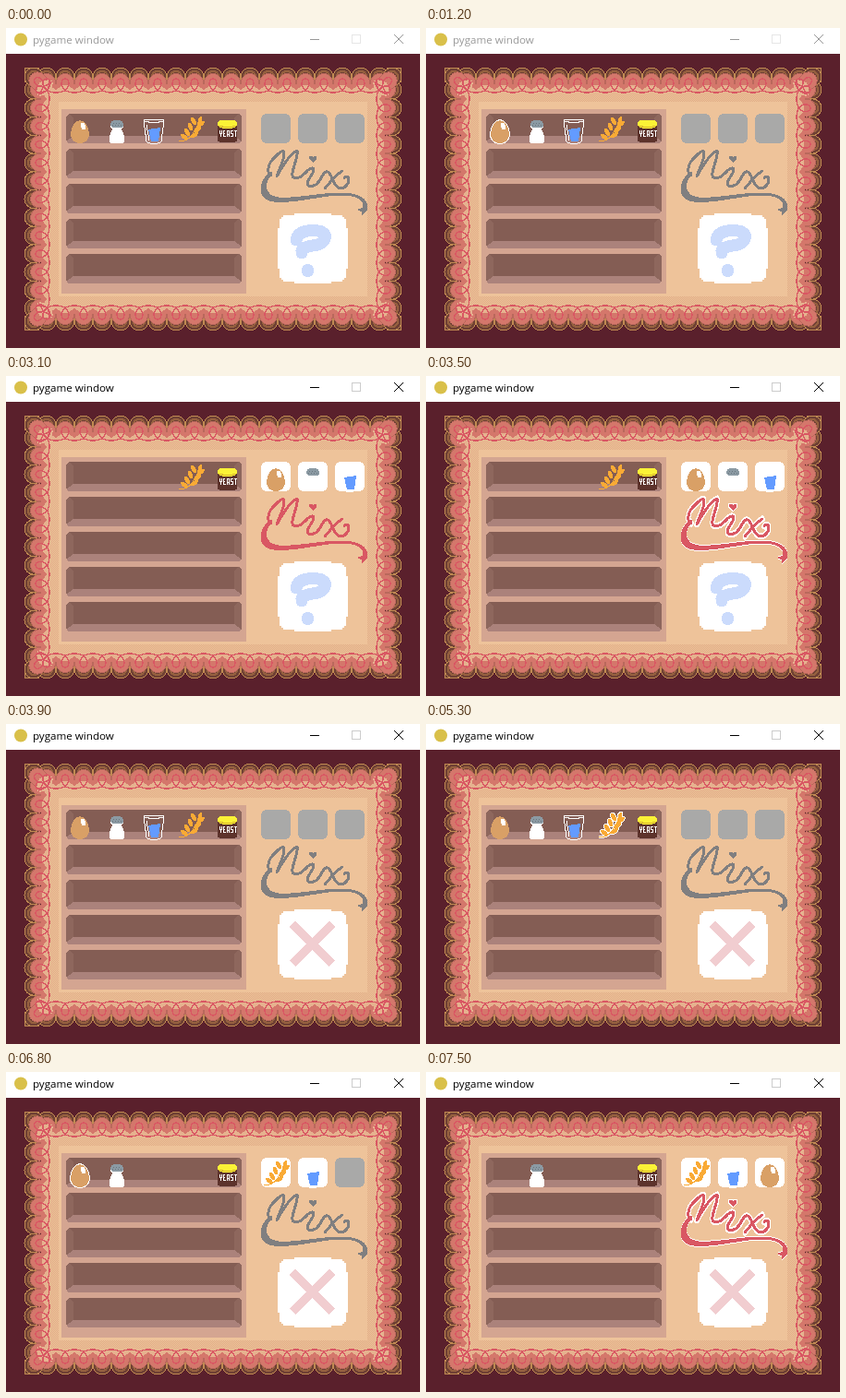
Recreate the animation shown at these times as an HTML page. Size 448 px wide and 347 px high, loop 8 s.

```html
<!DOCTYPE html>
<html lang="en">
<head>
<meta charset="utf-8">
<title>pygame window</title>
<style>
  html, body { margin: 0; width: 100%; height: 100%; overflow: hidden; background: #5a202c; }
  svg { display: block; width: 448px; height: 347px; }
  #title { font: 11.6px "Open Sans", "Noto Sans", sans-serif; }
</style>
</head>
<body>
<svg id="stage" viewBox="0 0 448 347" shape-rendering="crispEdges" fill="none">
  <defs>
    <pattern id="dots" width="2" height="2" patternUnits="userSpaceOnUse">
      <path d="M0 0h1v1h-1zM1 1h1v1h-1z" fill="#e0ac86"/>
    </pattern>
    <g id="back">
      <circle cy="10" r="10" fill="#6f4034" stroke="#c08a52"/>
      <path d="M-6 9Q-5 4 0 4Q5 4 6 9" stroke="#95603f" stroke-width="2"/>
    </g>
    <circle id="petal" cy="16" r="9.5" fill="#d4776b" stroke="#b9685c"/>
    <path id="loop" d="M-10 27C7 27 6 12 0 12C-6 12 -7 27 10 27" stroke="#d95763" stroke-width="1.5"/>
    <path id="hem" d="M-10 25Q0 13 10 25V30H-10Z" fill="#e6b28f"/>
    <g id="mixShape">
      <path d="M287 160C281 156 284 146 291 140C295 136 299 132 301 134C302 142 296 152 293 161C299 150 308 136 315 133C317 140 309 152 310 160C311 165 318 163 323 158C328 152 333 150 333 154C332 160 326 164 326 169C327 174 335 172 339 166C343 160 344 155 348 156C353 158 354 172 361 174C367 174 371 169 371 164C370 160 367 161 366 163"/>
      <path d="M364 155C356 160 350 168 345 174"/>
      <path class="fill" d="M287 156C273 165 271 186 290 188C312 191 340 181 362 181C378 181 388 185 387 195L381 197L386 199L385 203L391 197C392 184 380 179 362 179C338 179 312 186 295 184C279 182 278 168 288 158Z" stroke-width="1"/>
    </g>
    <path id="heart" d="M332 146L328 142V139H331L332 140L333 139H336V142Z"/>
  </defs>

  <path d="M0 28H448V347H0Z" fill="#5a202c"/>
  <g id="lace"></g>
  <path d="M60 88H260V288H60Z" fill="#d4a591"/>
  <g id="shelves"></g>
  <g id="slots"></g>

  <g id="mix" stroke-linecap="round" stroke-linejoin="round">
    <g id="mixHalo" stroke="#fff" stroke-width="5">
      <use href="#mixShape"/>
      <use href="#mixShape" y="-1"/>
      <use href="#mixShape" y="1"/>
      <use href="#heart" stroke-width="2"/>
    </g>
    <g id="mixInk" stroke-width="3">
      <use href="#mixShape"/>
      <use href="#heart" stroke-width="0"/>
    </g>
  </g>

  <path d="M312 201H352V203H364V205H366V207H368V217H370V261H368V271H366V273H364V275H352V277H312V275H300V273H298V271H296V261H294V217H296V207H298V205H300V203H312Z" fill="#fff"/>
  <g id="ask">
    <path d="M314 230C316 220 328 219 338 220C349 222 347 232 337 235C325 237 319 238 320 244" stroke="#cbdbfc" stroke-width="13" stroke-linecap="round"/>
    <circle cx="326.500" cy="263" r="7" fill="#cbdbfc"/>
  </g>
  <path id="cross" d="M310 217L353 260M353 217L310 260" stroke="#f1cdd0" stroke-width="9"/>

  <g id="items"></g>

  <path d="M0 0H448V28H0Z" fill="#fff"/>
  <circle cx="16" cy="12.500" r="7" fill="#d9c04a" shape-rendering="auto"/>
  <text id="title" x="29" y="17">pygame window</text>
  <path id="maximise" d="M374.500 7.500H383.500V16.500H374.500Z"/>
  <g id="controls">
    <path d="M329 12.500H339"/>
    <path d="M420 7L430 17M430 7L420 17" shape-rendering="auto"/>
  </g>
</svg>

<script>
const LOOP = 8000;
const $ = id => document.getElementById(id);
const range = n => [...Array(n).keys()];

// time, picked items in slot order, hovered thing
const steps = [
  [0, '', ''], [700, '', 'grain'], [900, '', ''], [1200, '', 'egg'],
  [1500, 'egg', ''], [1800, 'egg', 'salt'], [2200, 'egg salt', ''],
  [2600, 'egg salt', 'water'], [3100, 'egg salt water', ''],
  [3500, 'egg salt water', 'mix'], [3900, '', ''],
  [4700, '', 'yeast'], [4900, '', ''], [5300, '', 'grain'],
  [5700, 'grain', ''], [6000, 'grain', 'water'], [6400, 'grain water', ''],
  [6700, 'grain water', 'salt'], [6800, 'grain water', 'egg'],
  [7100, 'grain water egg', ''], [7500, 'grain water egg', 'mix']
];

function drawLace() {
  const spots = [];
  const add = (x, y, a) => spots.push(`translate(${x} ${y}) rotate(${a})`);
  for (const i of range(19)) {
    add(44 + i * 20, 43, 0);
    add(44 + i * 20, 328, 180);
  }
  for (const i of range(13)) {
    add(20, 67 + i * 19.75, -90);
    add(428, 67 + i * 19.75, 90);
  }
  add(23, 46, -45);
  add(425, 46, 45);
  add(425, 325, 135);
  add(23, 325, -135);
  const layer = id => spots.map(t => `<use href="#${id}" transform="${t}"/>`).join('');
  const corner = (x, y) =>
    `<path d="M${x} ${y}h15v15h-15z" fill="#6f4034" stroke="#c08a52"/>`;
  $('lace').innerHTML =
    corner(20.5, 43.5) + corner(412.5, 43.5) + corner(20.5, 312.5) + corner(412.5, 312.5) +
    layer('back') + layer('petal') +
    '<path d="M38 61H410V310H38Z" fill="#d4776b"/>' + layer('hem') +
    '<path d="M46 69H402V302H46Z" fill="#eec39a"/>' +
    '<path d="M51 74H397V297H51Z" stroke="url(#dots)" stroke-width="12"/>' +
    layer('loop');
}

function drawShelves() {
  $('shelves').innerHTML = range(5).map(i => `<g transform="translate(65 ${93 + i * 38})">
    <path d="M3 0H187L190 3V29L187 32H3L0 29V3Z" fill="#8e675d"/>
    <path d="M3 0H187L182 4V24H8V4Z" fill="#845d54"/>
    <path d="M8 24H182L190 30L187 32H3L0 30Z" fill="#ab827b"/></g>`).join('');
  $('slots').innerHTML = range(3).map(i =>
    `<rect x="${276 + i * 40}" y="93" width="32" height="32" rx="6"/>`).join('');
}

// Each item lives in a 32 px box; shape is its silhouette.
const eggShape = '<path d="M16 7C21 7 26 15 26 22C26 28 22 32 16 32C10 32 6 28 6 22C6 15 11 7 16 7Z"/>';
const saltShape = '<path d="M9 14V11Q10 7 14 7H18Q22 7 23 11V14L21 17Q24 21 24 29Q24 32 21 32H11Q8 32 8 29Q8 21 11 17Z"/>';
const glassShape = '<path d="M5 7L8 30Q9 32 12 32H20Q23 32 24 30L27 7Q16 5 5 7Z" fill="none"/>';
const jarShape = '<path d="M5 10Q6 7 10 7H21Q25 7 26 10V28Q26 31 22 31H9Q5 31 5 28Z"/>';
const kernel = (x, y, a) =>
  `<ellipse cx="${x}" cy="${y}" rx="4" ry="1.700" transform="rotate(${a} ${x} ${y})"/>`;
const grainShape = '<path d="M3 30Q13 30 18 22T26 6" fill="none"/>' +
  range(3).map(i => {
    const x = 15 + i * 3.5, y = 24 - i * 6;
    return kernel(x - 3, y - 4, 65) + kernel(x + 5, y - 1, -40);
  }).join('') + kernel(26, 7, -75) + kernel(9, 25, 40);

const letters = 'M7.500 18V21L8.500 22L9.500 21V18M8.500 22V25' +
  'M13 18.500H11.500V24.500H13.500M11.500 21.500H13' +
  'M15.500 25V19L16.500 18.500L17.500 19V25M15.500 22.500H17.500' +
  'M21.500 18.500H19.500V21.500H21V24.500H19' +
  'M22.500 18.500H26M24.500 18V25';

const items = {
  egg: [eggShape, `<g fill="#d9a066">${eggShape}</g>
    <ellipse cx="19.500" cy="13.500" rx="2.500" ry="4" transform="rotate(-20 19.500 13.500)" fill="#fff"/>`],
  salt: [saltShape, `<g fill="#fff">${saltShape}</g>
    <path d="M9 13V11Q10 7 14 7H18Q22 7 23 11V13L21 15H11Z" fill="#8b9aa3"/>
    <path d="M12 10.500H20M11 12.500H22" stroke="#69757d" stroke-dasharray="1 2"/>`],
  water: [glassShape, `<g stroke="#fff">${glassShape}</g>
    <path d="M6 8Q16 11 26 8M8 12L11 29" stroke="#fff"/>
    <path d="M10 17L23 15L21 30H13Z" fill="#639bff"/>`],
  grain: [grainShape, `<g fill="#f9aa35" stroke="#f9aa35" stroke-width="1">${grainShape}</g>`],
  yeast: [jarShape, `<g fill="#5d332c">${jarShape}</g>
    <path d="M5 10Q6 7 10 7H21Q25 7 26 10V13Q24 16 16 16Q7 16 5 13Z" fill="#fbf236"/>
    <path d="M6 13Q16 16 25 13" stroke="#d9b52a"/>
    <path d="${letters}" stroke="#fff"/>`]
};
const names = Object.keys(items);

function drawItems() {
  $('items').innerHTML = names.map(name => {
    const [shape, art] = items[name];
    const width = name === 'grain' || name === 'water' ? 3 : 2;
    return `<g id="${name}"><g id="${name}Halo" fill="#fff" stroke="#fff" stroke-width="${width}">${shape}</g>${art}</g>`;
  }).join('');
}

const show = (id, on) => $(id).setAttribute('visibility', on ? 'visible' : 'hidden');

function render(t) {
  const [, list, hover] = steps.findLast(s => s[0] <= t);
  const picks = list ? list.split(' ') : [];
  names.forEach((name, i) => {
    const slot = picks.indexOf(name);
    const x = slot < 0 ? 64 + i * 40 : 276 + slot * 40;
    $(name).setAttribute('transform', `translate(${x} 93)`);
    show(name + 'Halo', hover === name);
  });
  [...$('slots').children].forEach((box, i) =>
    box.setAttribute('fill', i < picks.length ? '#fff' : '#a9a9a8'));

  const ink = picks.length === 3 ? '#d95763' : '#807f80';
  $('mixInk').setAttribute('stroke', ink);
  $('mixInk').lastElementChild.setAttribute('fill', ink);
  document.querySelector('#mixShape .fill').setAttribute('fill', 'none');
  show('mixHalo', hover === 'mix');

  const failed = t >= 3900;
  show('ask', !failed);
  show('cross', failed);

  const focused = t >= 1500;
  $('title').setAttribute('fill', focused ? '#000' : '#999');
  $('controls').setAttribute('stroke', focused ? '#000' : '#999');
  $('maximise').setAttribute('stroke', focused ? '#ccc' : '#e6e6e6');
}

// The ribbon is filled with whatever colour strokes it.
document.querySelector('#mixShape .fill').style.fill = 'context-stroke';

drawLace();
drawShelves();
drawItems();

const start = performance.now();
function tick() {
  render((performance.now() - start) % LOOP);
  requestAnimationFrame(tick);
}
tick();
</script>
</body>
</html>
```
